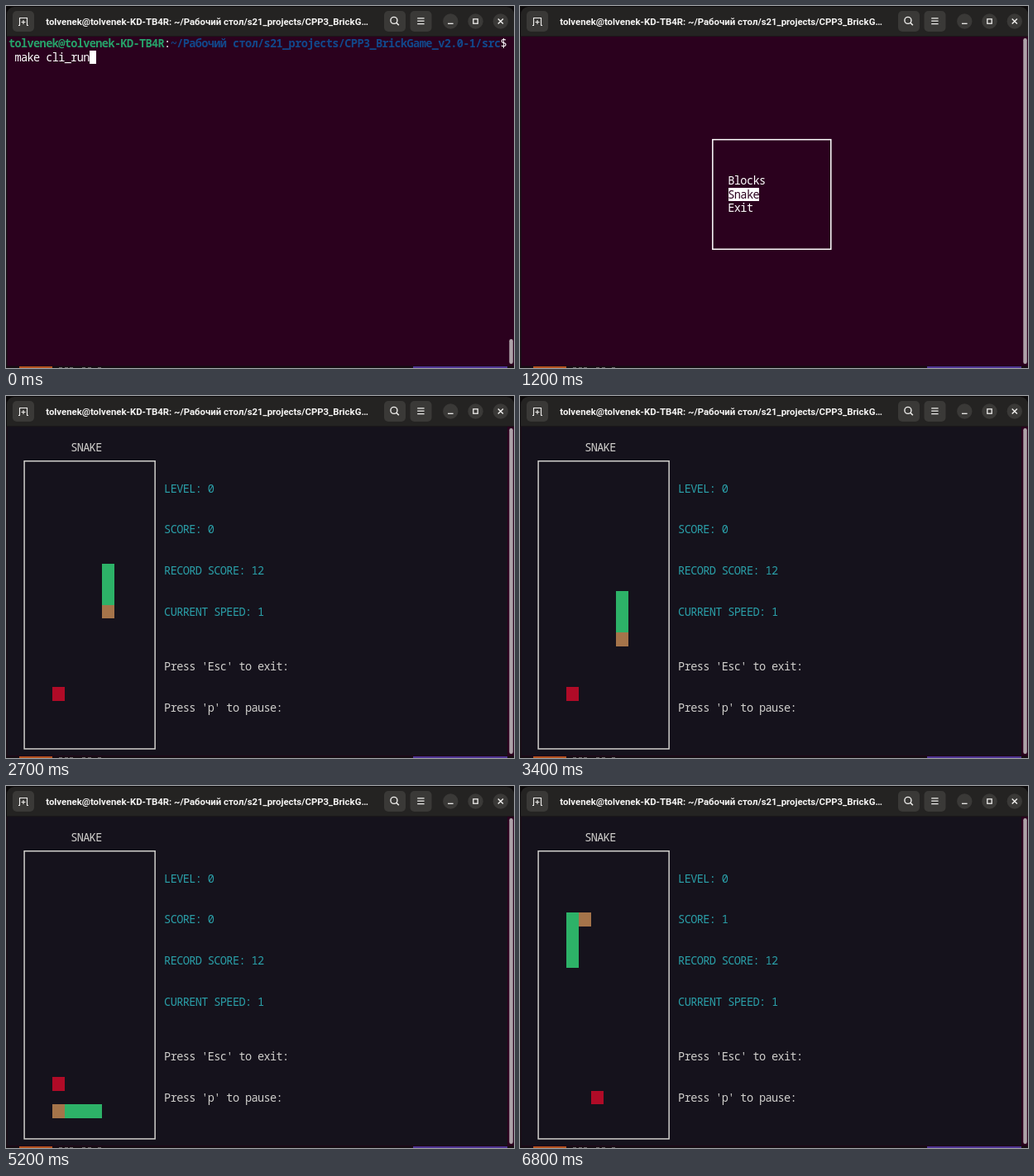
Write an HTML page with a canvas that moves like this. It is 614 px wide and 438 px high and loops after 8000 ms.

```html
<!DOCTYPE html>
<html lang="ru">
<head>
<meta charset="utf-8">
<title>Terminal snake</title>
<style>
  html, body { margin: 0; width: 100%; height: 100%; overflow: hidden; background: #120c10; }
  canvas { display: block; width: 614px; height: 438px; }
</style>
</head>
<body>
<canvas id="stage" width="614" height="438"></canvas>
<script>
const ctx = document.getElementById('stage').getContext('2d');
const LOOP = 8000;
const CELL = 7.525, LINE = 16.58, LEFT = 3.3, TOP = 37.3;
const USER = 'tolvenek@tolvenek-KD-TB4R';
const DIR = '~/Рабочий стол/s21_projects/CPP3_BrickGame_v2.0-1/src';
const PURPLE = '#2b011e', NIGHT = '#15121c', GREY = '#d0cfcc', CYAN = '#2a9fa8';
const GREEN = '#2db268', BROWN = '#a5744a', RED = '#b00b27';

const colX = c => LEFT + c * CELL;
const rowY = r => TOP + r * LINE;

function rect(x, y, w, h, color) {
  ctx.fillStyle = color;
  ctx.fillRect(x, y, w, h);
}

function rounded(x, y, w, h, r, color) {
  ctx.fillStyle = color;
  ctx.beginPath();
  ctx.roundRect(x, y, w, h, r);
  ctx.fill();
}

function stroke(color, width, ...lines) {
  ctx.strokeStyle = color;
  ctx.lineWidth = width;
  ctx.beginPath();
  for (const [x1, y1, x2, y2] of lines) {
    ctx.moveTo(x1, y1);
    ctx.lineTo(x2, y2);
  }
  ctx.stroke();
}

// Text on the terminal grid
function print(text, col, row, color, weight = 400) {
  ctx.font = `${weight} 13.6px "Noto Sans Mono", "DejaVu Sans Mono", monospace`;
  ctx.letterSpacing = '0px';
  const gap = CELL - ctx.measureText('m').width;
  ctx.letterSpacing = gap + 'px';
  ctx.fillStyle = color;
  ctx.fillText(text, colX(col) + gap / 2, rowY(row) + 13);
  ctx.letterSpacing = '0px';
}

function fillCells(col, row, count, color) {
  const x = Math.round(colX(col)), y = Math.round(rowY(row));
  rect(x, y, Math.round(colX(col + count)) - x, Math.round(rowY(row + 1)) - y, color);
}

// Box drawn through the middles of its corner cells
function frame(c1, r1, c2, r2, color) {
  ctx.strokeStyle = color;
  ctx.lineWidth = 1.5;
  const x = colX(c1 + 0.5), y = rowY(r1 + 0.5);
  ctx.strokeRect(x, y, (c2 - c1) * CELL, (r2 - r1) * LINE);
}

const titleText = `${USER}: ~/Рабочий стол/s21_projects/CPP3_BrickG…`;
const titleFont = size => `700 ${size}px Roboto, "Noto Sans", sans-serif`;
let titleSize = 0;

function drawTitle() {
  if (!titleSize) {
    ctx.font = titleFont(12);
    titleSize = 12 * 390 / ctx.measureText(titleText).width;
  }
  ctx.font = titleFont(titleSize);
  ctx.fillStyle = '#f6f5f4';
  ctx.textAlign = 'center';
  ctx.fillText(titleText, 243, 22.5);
  ctx.textAlign = 'left';
}

function drawHeader() {
  const ink = '#f0efed', button = '#3a3937';
  rect(0, 0, 614, 37, '#0c0a0b');
  rounded(1, 1, 613, 36, [9, 9, 0, 0], '#242322');
  rect(1, 36, 613, 1, '#1b1819');
  for (const x of [8, 457, 488.5]) rounded(x, 6, 26, 25, 5, button);

  stroke(ink, 1.1,
    [16.5, 23.5, 16.5, 14.5], [16, 14.5, 26, 14.5], [25.5, 14.5, 25.5, 23.5],
    [15, 23.5, 17, 23.5], [25, 23.5, 27, 23.5],
    [21, 17, 21, 22], [18.5, 19.5, 23.5, 19.5]);

  ctx.lineWidth = 1.4;
  ctx.beginPath();
  ctx.arc(468.9, 17.4, 4, 0, 2 * Math.PI);
  ctx.stroke();
  stroke(ink, 1.6, [471.8, 20.3, 474.8, 23.3]);
  stroke(ink, 1.2, ...[14.8, 18.2, 21.6].map(y => [497.2, y, 505.6, y]));

  for (const x of [537.3, 567.5, 597.8]) {
    ctx.fillStyle = button;
    ctx.beginPath();
    ctx.arc(x, 18.5, 9.2, 0, 2 * Math.PI);
    ctx.fill();
  }
  stroke(ink, 1.3, [534, 21.3, 540.6, 21.3]);
  ctx.strokeRect(564.8, 15.8, 5.4, 5.4);
  stroke(ink, 1.4, [594.7, 15.4, 600.9, 21.6], [600.9, 15.4, 594.7, 21.6]);
  drawTitle();
}

function drawEdges() {
  rect(0, 37, 1.5, 401, '#171014');
  rect(0, 435.5, 614, 2.5, '#150d12');
  rect(16, 436, 40, 2, '#b4521f');
  rect(492, 436, 114, 2, '#4f3593');
  for (const x of [64, 71, 77, 92, 99, 111]) rect(x, 437, 4, 1, '#6b6568');
}

function drawScrollbar(full) {
  const y = full ? 39 : 403;
  rounded(608.3, y, 4.5, 433 - y, 2.2, '#aea3a9');
}

function drawShell(t) {
  print(USER, 0, 0, '#26a269', 700);
  print(':', 25, 0, '#fff');
  print(DIR, 26, 0, '#12488b', 700);
  print('$', 79, 0, '#fff');
  print(' make cli_run', 0, 1, '#fff');
  if (t < 300) fillCells(13, 1, 1, '#fff');
  else fillCells(0, 2, 1, '#fff');
}

function drawMenu(t) {
  const chosen = t < 1200 ? 0 : 1;
  frame(30, 7, 49, 15, '#fff');
  ['Blocks', 'Snake', 'Exit'].forEach((name, i) => {
    if (i === chosen) fillCells(33, 10 + i, name.length, '#fff');
    print(name, 33, 10 + i, i === chosen ? PURPLE : '#fff');
  });
}

// Route of the head: down, left, up, right
const route = [];
for (let r = 9; r <= 21; r++) route.push([15, r]);
for (let c = 13; c >= 7; c -= 2) route.push([c, 21]);
for (let r = 20; r >= 7; r--) route.push([7, r]);
route.push([9, 7]);

// [time, position of the head on the route]
const moves = [
  [2700, 4], [2900, 5], [3400, 6], [3900, 8], [4000, 10], [4100, 12],
  [4300, 13], [4600, 14], [5100, 15], [5200, 16], [5700, 17], [6000, 18],
  [6300, 21], [6400, 24], [6500, 27], [6600, 30], [6800, 31]
];

function drawSnake(t) {
  const move = moves.filter(m => m[0] <= t).pop();
  if (!move) return;
  const head = move[1], length = t < 6000 ? 4 : 5;
  for (let i = head - length + 1; i <= head; i++) {
    fillCells(...route[i], 2, i === head ? BROWN : GREEN);
  }
}

function drawGame(t) {
  rect(1.5, 37, 604.5, 398, NIGHT);
  print('SNAKE', 10, 1, GREY);
  frame(2, 2, 23, 23, GREY);
  print('LEVEL: 0', 25, 4, CYAN);
  print('SCORE: ' + (t < 6200 ? 0 : 1), 25, 7, CYAN);
  print('RECORD SCORE: ' + (t < 2700 ? 0 : 12), 25, 10, CYAN);
  print('CURRENT SPEED: 1', 25, 13, CYAN);
  print("Press 'Esc' to exit:", 25, 17, GREY);
  print("Press 'p' to pause:", 25, 20, GREY);
  if (t < 6200) fillCells(7, 19, 2, RED);
  else fillCells(11, 20, 2, RED);
  drawSnake(t);
}

function draw(now) {
  const t = now % LOOP;
  rect(0, 0, 614, 438, PURPLE);
  if (t < 400) drawShell(t);
  else if (t < 1600) drawMenu(t);
  else drawGame(t);
  drawHeader();
  drawEdges();
  drawScrollbar(t >= 400);
}

const start = performance.now();
function tick() {
  draw(performance.now() - start);
  requestAnimationFrame(tick);
}
tick();
</script>
</body>
</html>
```
